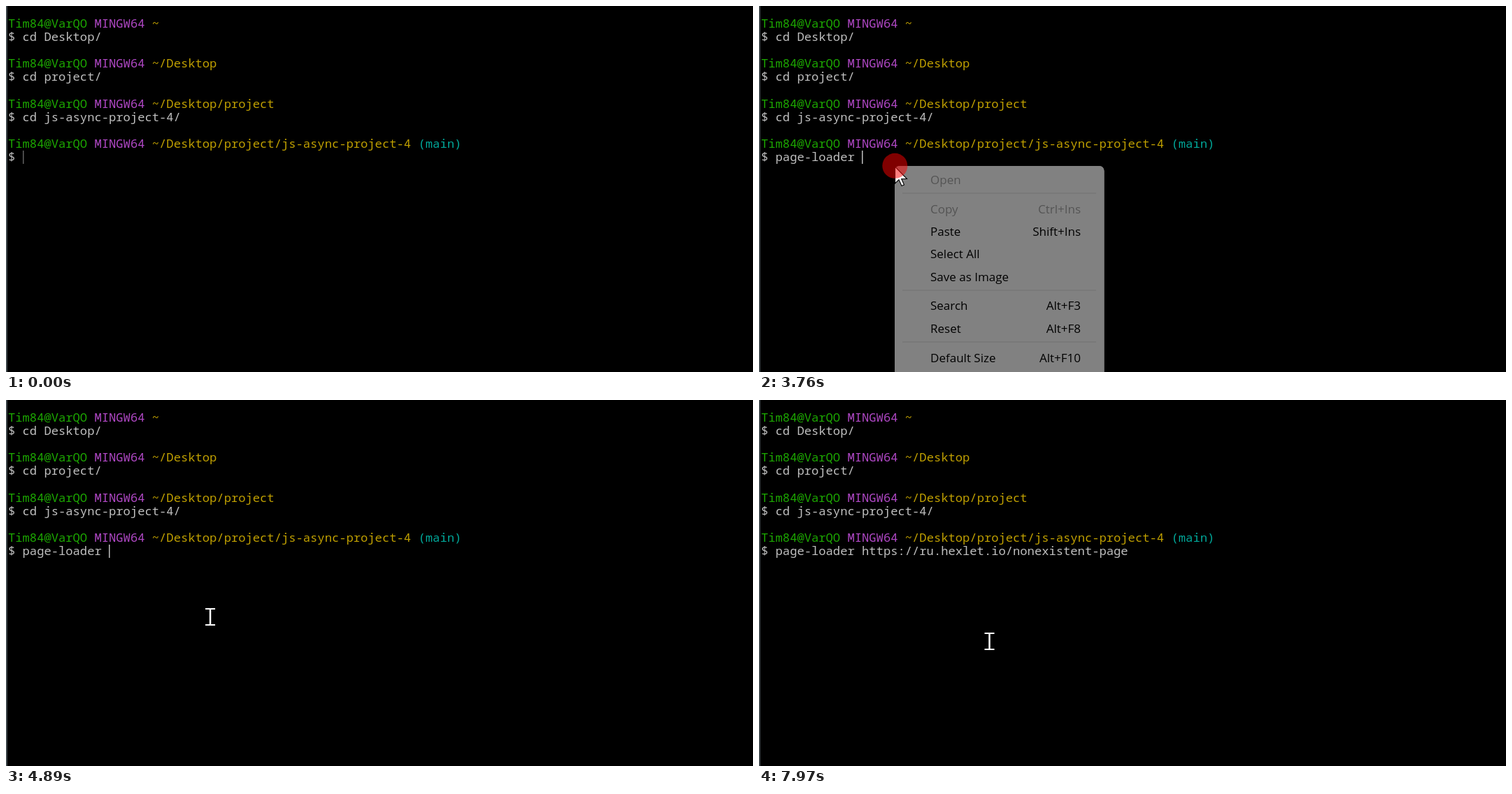
An HTML page with a canvas that plays this animation: 1068 by 524 pixels, repeating every 8000 ms.

```html
<!DOCTYPE html>
<html lang="en">
<head>
<meta charset="utf-8">
<title>Terminal session</title>
<style>
html, body { margin: 0; width: 100%; height: 100%; overflow: hidden; background: #000; }
canvas { display: block; }
</style>
</head>
<body>
<canvas id="stage" width="1068" height="524"></canvas>
<script>
const ctx = document.getElementById('stage').getContext('2d');
const LOOP = 8000, COL = 10.29, ROW = 19.1, LEFT = 3, TOP = 16;
const MONO = '500 17.15px "Noto Sans Mono", "DejaVu Sans Mono", monospace';
const SANS = '17px "Open Sans", "Noto Sans", sans-serif';
const GREEN = '#1ca800', PURPLE = '#b148c6', GOLD = '#c0a000', TEAL = '#00a89a', GREY = '#bfbfbf';

const COMMAND = 'page-loader ';
const URL_TEXT = 'https://ru.hexlet.io/nonexistent-page';
const KEYS = [1450, 1510, 1710, 1780, 2110, 2310, 2510, 2570, 2630, 2830, 2960, 3160];
const PASTE = 5220, ENTER = 6230, BLINK = 530;
const MENU_OPEN = 3740, MENU_CLOSE = 4890;

// Pointer path: time, x, y
const PATH = [
  [70, 768, 538], [200, 640, 450], [400, 380, 340], [720, 240.5, 296.5],
  [1450, 240.5, 296.5], [3160, 232, 281], [3360, 218, 262], [3500, 214, 257],
  [3640, 194, 229.5], [3880, 194, 229.5], [4290, 283, 303], [4360, 285, 310],
  [4870, 285, 310], [5300, 429, 320], [6230, 429, 320], [6760, 405, 328],
  [7030, 405, 328], [7300, 329.5, 347.5], [7770, 329.5, 347.5], [7970, 329.5, 345.5]
];

// Menu rows: label, shortcut, middle y, disabled
const MENU = [
  ['Open', '', 249, true], ['Copy', 'Ctrl+Ins', 290.5, true],
  ['Paste', 'Shift+Ins', 323], ['Select All', '', 355], ['Save as Image', '', 387.5],
  ['Search', 'Alt+F3', 429], ['Reset', 'Alt+F8', 461.5], ['Default Size', 'Alt+F10', 503.5]
];

const between = (t, a, b) => t >= a && t < b;
const clamp = v => Math.max(0, Math.min(1, v));

function rect(x, y, w, h, color) {
  ctx.fillStyle = color;
  ctx.fillRect(x, y, w, h);
}

function roundRect(x, y, w, h, r, color) {
  ctx.fillStyle = color;
  ctx.beginPath();
  ctx.roundRect(x, y, w, h, r);
  ctx.fill();
}

function text(str, col, row, color) {
  ctx.fillStyle = color;
  ctx.fillText(str, LEFT + col * COL, TOP + row * ROW + 15);
}

function prompt(row, path) {
  text('Tim84@VarQO', 0, row, GREEN);
  text('MINGW64', 12, row, PURPLE);
  text(path, 20, row, GOLD);
  text('$', 0, row + 1, GREY);
}

function caretVisible(t) {
  if (t < KEYS[0]) return t < 70 || between(t, 520, 1050);
  if (t < PASTE) return !between(t, 3690, MENU_OPEN);
  if (t < ENTER) return t < 5830;
  return Math.floor((t - ENTER) / BLINK) % 2 === 0;
}

function drawTerminal(t) {
  rect(0, 0, 1068, 524, '#000');
  rect(0, 0, 2, 524, '#3f474b');
  ctx.font = MONO;
  ctx.textAlign = 'left';
  prompt(0, '~');
  text('cd Desktop/', 2, 1, GREY);
  prompt(3, '~/Desktop');
  text('cd project/', 2, 4, GREY);
  prompt(6, '~/Desktop/project');
  text('cd js-async-project-4/', 2, 7, GREY);
  prompt(9, '~/Desktop/project/js-async-project-4');
  text('(main)', 57, 9, TEAL);

  const typed = KEYS.filter(k => t >= k).length;
  text(COMMAND.slice(0, typed), 2, 10, GREY);
  let col = 2 + typed, row = 10;
  if (t >= PASTE) {
    const selected = t < ENTER;
    if (selected) rect(147, 207, 382, 19, GREY);
    text(URL_TEXT, col, row, selected ? '#000' : GREY);
    col += URL_TEXT.length;
  }
  if (t >= 6290) [col, row] = [0, 11];
  if (caretVisible(t)) {
    rect(Math.round(LEFT + col * COL), 207 + (row - 10) * 19, 1.5, 19, t < 70 ? '#606060' : GREY);
  }
}

function drawMenu(t, mouse) {
  const shown = t < 4800 ? clamp(0.51 + (t - 3760) / 120) : clamp((MENU_CLOSE - t) / 60);
  if (t < MENU_OPEN || !shown) return;
  roundRect(194, 229, 299.5, 320, 7, '#f9f9f9');
  for (const y of [267.5, 406.5, 480.5]) rect(205, y, 277, 1, '#d8d8d8');
  ctx.font = SANS;
  for (const [label, shortcut, y, disabled] of MENU) {
    if (mouse.x > 201 && Math.abs(mouse.y - y + 2) < 16) {
      roundRect(201, y - 17, 286, 31.5, 3, '#f0f0f0');
    }
    ctx.fillStyle = disabled ? '#a0a0a0' : '#000';
    ctx.textAlign = 'left';
    ctx.fillText(label, 245, y + 6);
    ctx.textAlign = 'right';
    ctx.fillText(shortcut, 460, y + 6);
  }
  // The backdrop is black, so a black veil fades the whole menu at once
  if (shown < 1) roundRect(194, 229, 299.5, 320, 7, `rgba(0,0,0,${1 - shown})`);
}

function pointerAt(t) {
  const i = PATH.findIndex(p => p[0] > t);
  if (i === 0) return { x: PATH[0][1], y: PATH[0][2] };
  const [t0, x0, y0] = PATH.at(i < 0 ? -1 : i - 1);
  const [t1, x1, y1] = PATH.at(i);
  const k = t1 > t0 ? (t - t0) / (t1 - t0) : 0;
  return { x: x0 + (x1 - x0) * k, y: y0 + (y1 - y0) * k };
}

function drawBeam(x, y) {
  rect(x - 1.25, y - 11.5, 2.5, 23, '#fff');
  for (const dy of [-12.5, 10.5]) rect(x - 7, y + dy, 14, 2, '#fff');
}

function drawArrow(x, y) {
  const shape = new Path2D('M0 0V24L5.5 18.8L9.5 27.5L13 26L9.2 17.5H17Z');
  ctx.save();
  ctx.translate(x + 0.5, y + 0.5);
  ctx.fillStyle = '#fff';
  ctx.strokeStyle = '#000';
  ctx.lineWidth = 1.1;
  ctx.fill(shape);
  ctx.stroke(shape);
  ctx.restore();
}

function drawDisc(x, y, color, blend) {
  ctx.save();
  ctx.globalCompositeOperation = blend;
  ctx.fillStyle = color;
  ctx.beginPath();
  ctx.arc(x, y, 18, 0, 7);
  ctx.fill();
  ctx.restore();
}

function drawPointer(t, { x, y }) {
  if (t < 70 || between(t, KEYS[0], 3200) || between(t, ENTER, 6760)) return;
  const arrow = between(t, MENU_OPEN, MENU_CLOSE);
  const pressed = between(t, 3640, 3880) || between(t, 4750, 4870);
  (arrow ? drawArrow : drawBeam)(x, y);
  if (pressed) drawDisc(x + 0.3, y - 0.7, 'rgba(255,0,0,.5)', 'source-over');
  else if (arrow) drawDisc(x, y, '#ffff78', 'multiply');
}

function frame() {
  const t = performance.now() % LOOP;
  const mouse = pointerAt(t);
  drawTerminal(t);
  drawMenu(t, mouse);
  drawPointer(t, mouse);
  requestAnimationFrame(frame);
}
frame();
</script>
</body>
</html>
```
